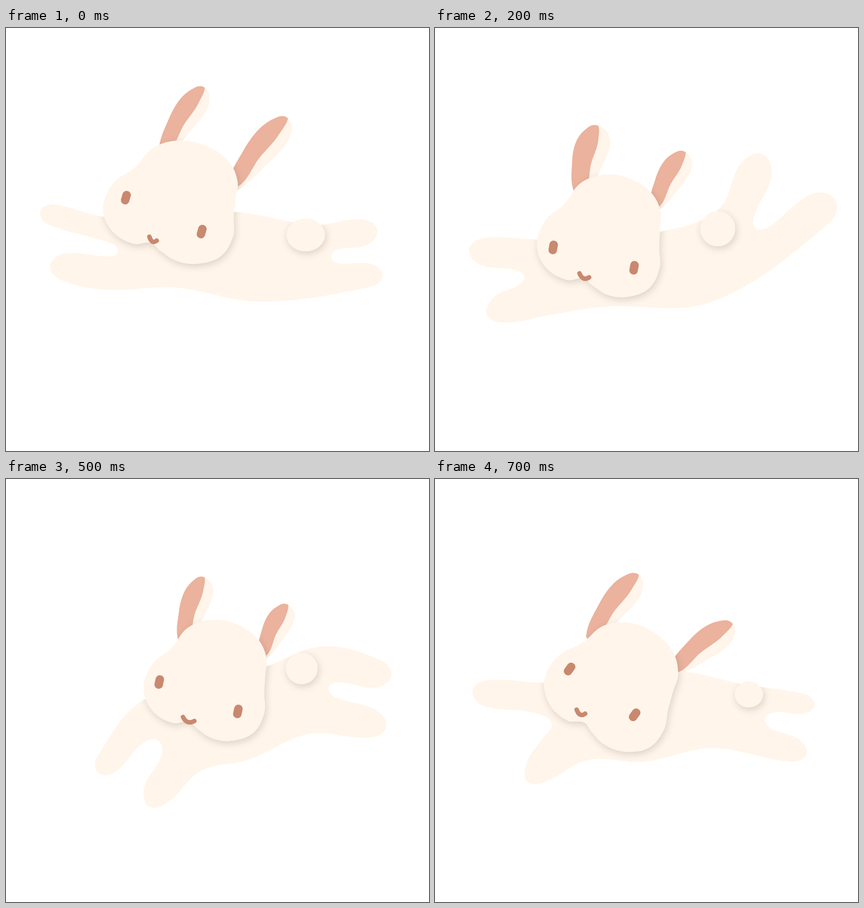
Write an HTML page with a canvas that moves like this. It is 748 px wide and 748 px high and loops after 0.8 s.

```html
<!DOCTYPE html>
<html lang="en">
<head>
<meta charset="utf-8">
<title>Leaping bunny</title>
<style>
html, body { margin: 0; width: 100%; height: 100%; overflow: hidden; background: #fff; }
canvas { display: block; }
</style>
</head>
<body>
<canvas id="stage" width="748" height="748"></canvas>
<script>
const ctx = document.getElementById('stage').getContext('2d');
const CREAM = '#fff5ea', PINK = '#ebb29d', BROWN = '#c98870';
const STEP = 100, STEPS = 8;

// Shared shapes: head in a unit box; ear as (along, across) its axis.
const HEAD = [[.57, 0], [.78, .05], [.93, .17], [.995, .33], [.98, .475], [.967, .62], [.962, .78], [.87, .94], [.69, 1],
  [.54, .975], [.425, .895], [.353, .83], [.225, .837], [.07, .737], [0, .555], [.07, .355], [.24, .215], [.37, .06]];
const EAR = [[-.12, -.35], [.33, -.92], [.68, -1], [.93, -.58], [1, -.1], [.94, .55], [.75, .9], [.42, .8], [-.12, .3]];
const LINING = [[-.12, .05], [.42, .15], [.78, .18], [1.05, -.25], [1.05, -2], [-.12, -2]];

// body: x,y,r keys (r > 0 paw, r < 0 gap between legs, 0 plain point)
// head: centre, size, turn    ears: base, tip, half width    eyes: two centres
// mouth: centre, width        tail: centre, radii
const poses = {
  0: {
    body: [180,334,0, 78,329,18, 187,393,-11, 102,423,24, 180,463,0, 300,459,0, 450,484,0, 646,437,20, 587,404,-12, 634,361,23, 545,348,0, 400,325,0],
    head: [291,308,239,218,0], earL: [286,208,352,106,26], earR: [410,270,499,160,28],
    eyes: [212,300,346,360], mouth: [260,375,13], tail: [530,366,34,29]
  },
  1: {
    body: [170,341,0, 76,361,24, 170,410,-12, 117,460,25, 210,472,0, 320,463,0, 470,470,0, 676,370,25, 575,382,-16, 606,294,24, 528,326,0, 402,336,0],
    head: [284,332,245,213,0], earL: [251,238,305,134,30], earR: [404,300,480,212,29],
    eyes: [203,318,339,388], mouth: [245,396,16], tail: [511,350,30,29]
  },
  2: {
    body: [190,374,0, 84,395,24, 144,442,-14, 115,498,25, 200,508,0, 300,493,0, 490,484,0, 682,319,30, 577,342,-16, 568,250,29, 500,322,0, 392,361,0],
    head: [291,369,223,218,-3], earL: [260,280,290,173,31], earR: [394,308,444,220,26],
    eyes: [209,388,352,424], mouth: [264,440,17], tail: [500,355,31,31]
  },
  4: {
    body: [232,356,0, 116,451,23, 212,446,-13, 187,520,24, 280,481,0, 420,507,0, 550,438,0, 680,371,27, 547,346,-11, 606,279,27, 500,299,0, 440,330,0],
    head: [340,355,231,231,0], earL: [318,258,338,155,25], earR: [443,281,483,185,27],
    eyes: [261,353,390,415], mouth: [304,418,27], tail: [492,346,24,28]
  },
  5: {
    body: [248,388,0, 177,504,21, 258,479,-20, 266,558,25, 345,516,0, 430,496,0, 535,451,0, 648,433,25, 583,372,-13, 657,344,25, 560,296,0, 455,333,0],
    head: [353,357,220,215,-2], earL: [317,275,352,174,26], earR: [458,305,500,223,24],
    eyes: [271,359,410,411], mouth: [323,427,20], tail: [523,335,28,28]
  },
  7: {
    body: [200,360,0, 89,378,23, 182,438,-25, 180,518,24, 270,497,0, 370,500,0, 490,476,0, 637,480,21, 598,427,-15, 654,398,17, 545,363,0, 425,340,0],
    head: [310,363,232,226,10], earL: [284,270,361,170,27], earR: [430,333,527,257,27],
    eyes: [238,336,353,417], mouth: [258,414,15], tail: [555,381,25,23]
  }
};

// Cubic in-between, halfway from b to c.
function between(a, b, c, d) {
  const pose = {};
  for (const part in b)
    pose[part] = b[part].map((v, i) => (9 * (v + c[part][i]) - a[part][i] - d[part][i]) / 16);
  return pose;
}
poses[3] = between(poses[1], poses[2], poses[4], poses[5]);
poses[6] = between(poses[4], poses[5], poses[7], poses[0]);
poses[6].drift = [-8, 17]; // the landing dips

const rad = deg => deg * Math.PI / 180;

// Smooth closed outline through the points.
function outline(pts) {
  const n = pts.length, at = i => pts[(i + n) % n];
  const handle = (i, j) => {
    const p = at(i - 1), q = at(i), r = at(i + 1), end = at(j);
    const k = 0.35 * (j - i) * Math.hypot(end[0] - q[0], end[1] - q[1]) / Math.hypot(r[0] - p[0], r[1] - p[1]);
    return [q[0] + (r[0] - p[0]) * k, q[1] + (r[1] - p[1]) * k];
  };
  const path = new Path2D();
  path.moveTo(...pts[0]);
  for (let i = 0; i < n; i++) path.bezierCurveTo(...handle(i, i + 1), ...handle(i + 1, i), ...at(i + 1));
  path.closePath();
  return path;
}

// Keys with a radius become rounded ends pointing away from their neighbours.
function bodyPath(list) {
  const keys = Array.from({ length: list.length / 3 }, (_, i) => list.slice(3 * i, 3 * i + 3));
  return outline(keys.flatMap(([x, y, r], i) => {
    if (!r) return [[x, y]];
    const p = keys[i - 1], n = keys[i + 1];
    const a = Math.atan2(y - (p[1] + n[1]) / 2, x - (p[0] + n[0]) / 2);
    const dx = Math.cos(a) * r, dy = Math.sin(a) * r, s = Math.sign(r);
    return [[x - dy, y + dx], [x + dx * s, y + dy * s], [x + dy, y - dx]];
  }));
}

function headPath([cx, cy, w, h, turn]) {
  const c = Math.cos(rad(turn)), s = Math.sin(rad(turn));
  return outline(HEAD.map(([u, v]) => {
    const x = (u - 0.5) * w, y = (v - 0.5) * h;
    return [cx + x * c - y * s, cy + x * s + y * c];
  }));
}

function fill(path, color) {
  ctx.fillStyle = color;
  ctx.fill(path);
}

// The shadow falls only on what is already painted.
function raised(path) {
  ctx.save();
  ctx.globalCompositeOperation = 'source-atop';
  ctx.shadowColor = 'rgba(105,85,75,.23)';
  ctx.shadowBlur = 13;
  ctx.shadowOffsetX = 2;
  ctx.shadowOffsetY = 4;
  fill(path, CREAM);
  ctx.restore();
  fill(path, CREAM);
}

function ear([x, y, tx, ty, w]) {
  const dx = tx - x, dy = ty - y, k = w / Math.hypot(dx, dy);
  const shape = pts => outline(pts.map(([t, s]) => [x + dx * t - dy * s * k, y + dy * t + dx * s * k]));
  const leaf = shape(EAR);
  fill(leaf, CREAM);
  ctx.save();
  ctx.clip(leaf);
  fill(shape(LINING), PINK);
  ctx.restore();
}

function ellipse(x, y, rx, ry, deg = 0) {
  const path = new Path2D();
  path.ellipse(x, y, rx, ry, rad(deg), 0, 2 * Math.PI);
  return path;
}

function eye(x, y, deg) {
  ctx.save();
  ctx.translate(x, y);
  ctx.rotate(rad(deg));
  const path = new Path2D();
  path.roundRect(-7.5, -12, 15, 24, 7);
  fill(path, BROWN);
  ctx.restore();
}

function mouth([x, y, w]) {
  ctx.strokeStyle = BROWN;
  ctx.lineWidth = 8;
  ctx.lineCap = 'round';
  ctx.beginPath();
  ctx.moveTo(x - w / 2, y - 6);
  ctx.quadraticCurveTo(x - w * 0.15, y + 8, x + w / 2, y + 1);
  ctx.stroke();
}

function draw({ body, head, earL, earR, eyes, mouth: lips, tail, drift = [0, 0] }) {
  ctx.clearRect(0, 0, 748, 748);
  ctx.save();
  ctx.translate(...drift);
  fill(bodyPath(body), CREAM);
  ear(earL);
  ear(earR);
  raised(headPath(head));
  raised(ellipse(...tail));
  const tilt = 16 + 2 * head[4];
  eye(eyes[0], eyes[1], tilt);
  eye(eyes[2], eyes[3], tilt);
  mouth(lips);
  ctx.restore();
}

function tick(now) {
  draw(poses[Math.floor(Math.max(0, now) / STEP) % STEPS]);
  requestAnimationFrame(tick);
}
tick(performance.now());
</script>
</body>
</html>
```
